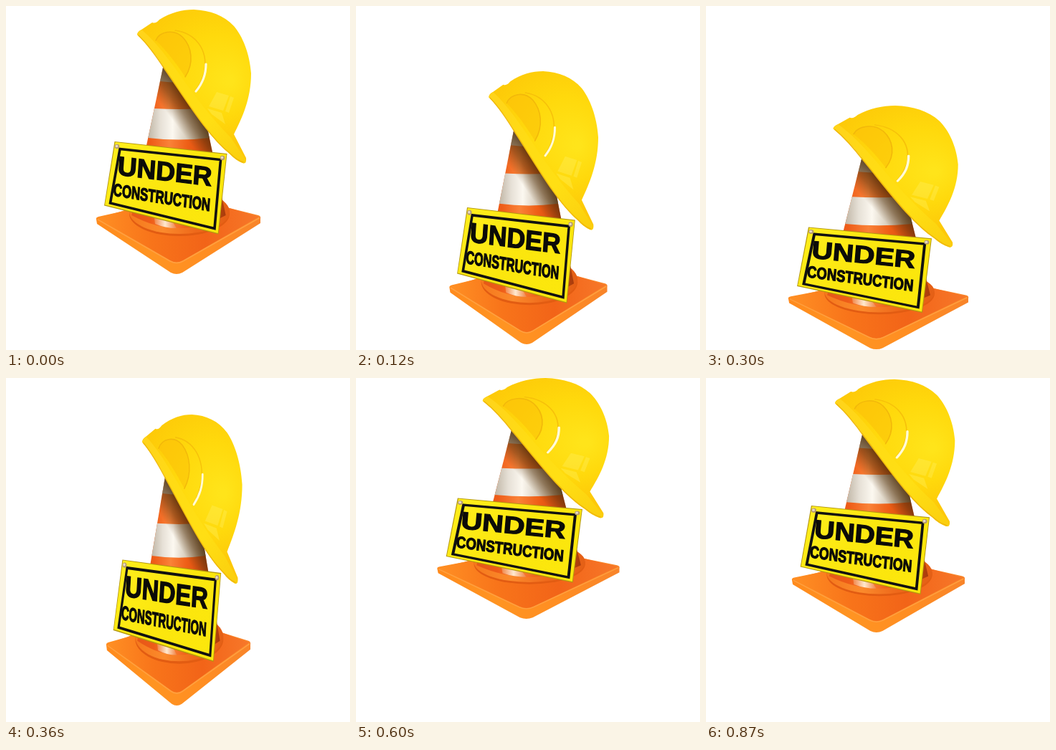
Write an HTML page with a canvas that moves like this. It is 480 by 480 pixels and loops after 900 ms.

```html
<!DOCTYPE html>
<html lang="en">
<head>
<meta charset="utf-8">
<title>Under construction</title>
<style>
  html, body { margin: 0; width: 100%; height: 100%; overflow: hidden; background: #fff; }
  canvas { display: block; width: 480px; height: 480px; }
</style>
</head>
<body>
<canvas id="stage" width="480" height="480"></canvas>
<script>
const ctx = document.getElementById('stage').getContext('2d');
const STEP = 30, STEPS = 30;
const REST = { x: 240.5, floor: 374, w: 229, h: 368 };

// Half a bounce, from full squash on the floor to the apex; mirrored for the fall.
const WIDTHS = [287, 274, 251, 220, 201, 204, 215, 229, 241, 246, 249.5, 252, 254, 254.6, 255];
const FLOORS = [480, 480, 479, 472, 457, 428, 399, 374, 355, 347.5, 342, 338.5, 336, 335.2, 334.8];

function gradient(x0, y0, x1, y1, ...colors) {
  const g = ctx.createLinearGradient(x0, y0, x1, y1);
  colors.forEach((c, i) => g.addColorStop(i / (colors.length - 1), c));
  return g;
}

function fill(path, style) {
  ctx.fillStyle = style;
  ctx.fill(new Path2D(path));
}

function stroke(path, style, width) {
  ctx.strokeStyle = style;
  ctx.lineWidth = width;
  ctx.stroke(new Path2D(path));
}

function ellipse(x, y, rx, ry, style) {
  ctx.fillStyle = style;
  ctx.beginPath();
  ctx.ellipse(x, y, rx, ry, 0, 0, Math.PI * 2);
  ctx.fill();
}

function drawBase() {
  fill('M126 298Q125 295 129 294L160 287L235 262L308 281L352 292Q356 293 355 297L355 303L246 372Q238 376 230 372L127 304Z',
    gradient(126, 0, 355, 0, '#ff8a1c', '#ff9422', '#ff8e22', '#f8842a'));
  fill('M127 296L160 287L235 262L308 281L353 294L247 355Q238 360 229 355Z',
    gradient(126, 0, 355, 0, '#ff9024', '#f8741a', '#f26418', '#f7782a'));
  stroke('M128 298L229 356Q238 361 247 356L353 296', '#ffa040', 1.5);
  ellipse(242, 290, 70, 31, '#e25c12');
  ellipse(242, 287, 70, 31, gradient(172, 0, 312, 0, '#f5781c', '#fb8a2c', '#ee681a', '#e46016'));
}

const coneLeft = y => 219 - (y - 86) * 0.212;
const coneRight = y => 263 + (y - 86) * 0.212;

function coneBand(top, bottom, sagTop, sagBottom, paint) {
  const [l0, r0, l1, r1] = [coneLeft(top), coneRight(top), coneLeft(bottom), coneRight(bottom)];
  const style = Array.isArray(paint) ? gradient(l1, 0, r1, 0, ...paint) : paint;
  fill(`M${l0} ${top}Q241 ${top + sagTop} ${r0} ${top}L${r1} ${bottom}Q241 ${bottom + sagBottom} ${l1} ${bottom}Z`, style);
}

function drawCone() {
  const orange = ['#e65818', '#ee5c18', '#fa8238', '#ee5e16', '#d04a0e', '#a83c0c'];
  const white = ['#c0b6a6', '#e6e0d6', '#fcf8f0', '#dcd3c4', '#bdad97', '#8d7a60'];
  coneBand(86, 292, 0, 36, orange);
  coneBand(80, 105, 2, 3, white);
  coneBand(143, 184, 2, 5, white);
  fill('M206 288L228 294L238 310Q222 310 208 304Z', gradient(204, 0, 240, 0, '#ee7430', '#ffe9cf', '#ee7430'));
  // shade cast by the helmet
  coneBand(80, 215, 0, 0, gradient(264, 143, 236, 164, 'rgba(72,42,8,.85)', 'rgba(84,50,12,.5)', 'rgba(96,60,20,0)'));
}

function drawHelmet() {
  const shell = ctx.createRadialGradient(312, 105, 5, 280, 90, 110);
  shell.addColorStop(0, '#ffe41a');
  shell.addColorStop(0.5, '#ffd90c');
  shell.addColorStop(1, '#fdc808');
  fill('M183 40Q183 36 189 33L204 23Q209 25 214 19C230 9 246 5 262 5C285 6 304 13 318 28C330 42 340 66 342 94C342 130 329 157 318 179L335 212Q336 221 330 219Q320 215 312 206C281 181 249 127 222 88C211 70 199 55 183 40Z', shell);
  // brim
  fill('M183 40Q184 36 189 33C203 44 221 66 239 91C264 127 288 158 314 184L334 214Q335 221 330 219Q320 215 312 206C281 181 249 127 222 88C211 70 199 55 183 40Z',
    gradient(190, 40, 330, 215, '#ffd41a', '#ffdc14', '#ffdf14', '#fbcf0e'));
  stroke('M185 41C200 56 211 72 222 89C250 129 281 181 313 206Q322 215 331 218', '#f0b80c', 1.5);
  // front ridge
  fill('M209 48C214 36 234 31 247 44C259 57 263 79 250 99C238 80 222 60 209 48Z', 'rgba(250,186,8,.45)');
  stroke('M209 48C214 36 234 31 247 44C259 57 263 79 250 99', '#f2b80a', 1.5);
  stroke('M236 34C264 38 282 60 277 91Q273 108 264 118', '#f6c00a', 1.5);
  ctx.lineCap = 'round';
  stroke('M279 81C279 96 275 107 265 119', '#fffbd8', 3.2);
  // reflections
  fill('M294 120L311 125L303 146L283 140Z', 'rgba(255,244,120,.28)');
  fill('M281 143L301 149L306 165L287 151Z', 'rgba(255,244,110,.3)');
  fill('M313 126L318 128L311 149L306 147Z', 'rgba(255,244,120,.28)');
}

function lettering(text, x, y, size, slope, condense) {
  ctx.save();
  ctx.transform(1, slope, -0.07, 1, x, y);
  ctx.scale(condense, 1);
  ctx.font = `bold ${size}px "Liberation Sans", Arial, sans-serif`;
  ctx.fillText(text, 0, 0);
  ctx.lineWidth = 1.3;
  ctx.strokeText(text, 0, 0);
  ctx.restore();
}

function drawSign() {
  fill('M151.5 189L308.5 206L296.5 318.5L137 278.5Z', '#b3970e');
  fill('M152.5 190L307.5 207L295.7 317L138 277.5Z', gradient(150, 190, 290, 315, '#ffee1c', '#fbe60e', '#fce70c'));
  stroke('M159 199.5L299.5 214.5L291 310.5L145.5 275Z', '#111', 3.6);
  for (const [x, y] of [[155, 196], [302, 212]]) {
    ellipse(x, y, 3.3, 3.3, '#b59a72');
    ellipse(x - 0.5, y - 0.5, 1.8, 1.8, '#e9dcc6');
  }
  ctx.fillStyle = ctx.strokeStyle = '#0b0b08';
  lettering('UNDER', 155, 235.5, 37, 0.12, 1);
  lettering('CONSTRUCTION', 149.3, 264.5, 24.5, 0.16, 0.685);
}

function draw(now) {
  const n = Math.floor(now / STEP) % STEPS;
  const k = n < 8 ? 7 - n : n < 23 ? n - 8 : 37 - n;
  const w = WIDTHS[k], h = 670.3 - 1.32 * w;
  ctx.setTransform(1, 0, 0, 1, 0, 0);
  ctx.fillStyle = '#fff';
  ctx.fillRect(0, 0, 480, 480);
  ctx.translate(REST.x, FLOORS[k]);
  ctx.scale(w / REST.w, h / REST.h);
  ctx.translate(-REST.x, -REST.floor);
  drawBase();
  drawCone();
  drawHelmet();
  drawSign();
}

const start = performance.now();
function tick() {
  draw(performance.now() - start);
  requestAnimationFrame(tick);
}
tick();
</script>
</body>
</html>
```
